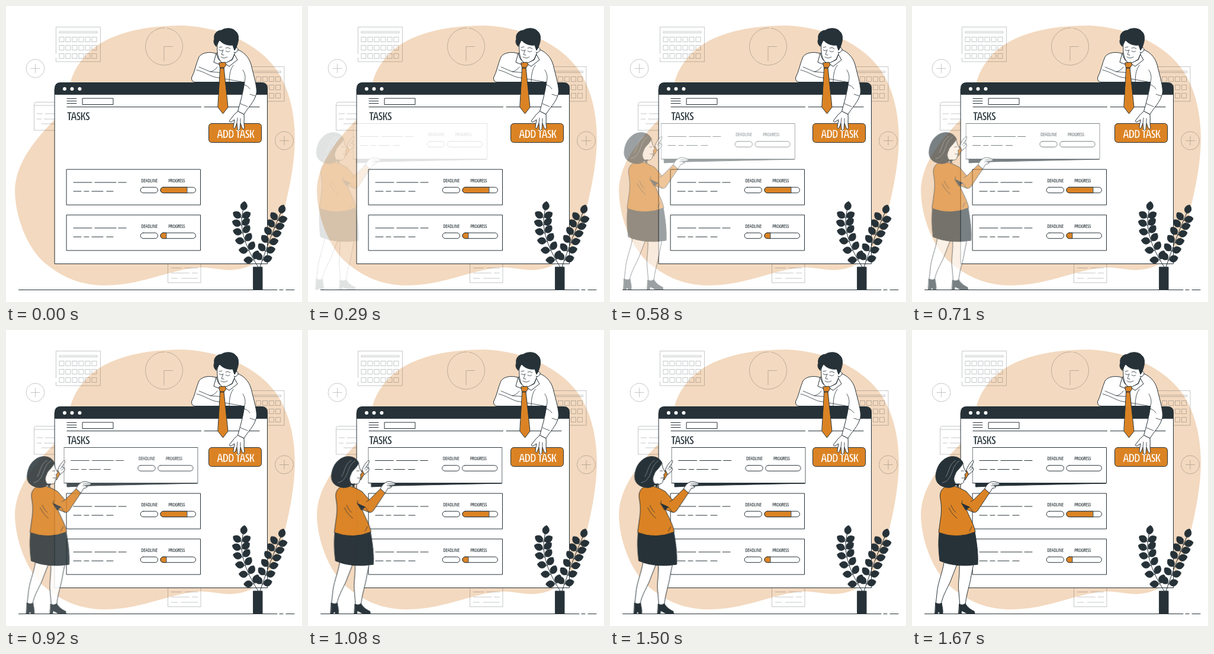
Animation of 500 by 500 pixels, one loop 1.71 s. Source, as an HTML page:

```html
<!DOCTYPE html>
<html lang="en">
<head>
<meta charset="utf-8">
<title>Task board</title>
<style>
  html, body { margin: 0; width: 100%; height: 100%; overflow: hidden; background: #fff; }
  svg { display: block; width: 100%; height: 100%; }
  /* A thin outline in the ground colour lightens the heavy condensed face. */
  text { font-family: "Open Sans Condensed", "Open Sans", "Roboto Condensed", Roboto, sans-serif;
         font-stretch: 75%; letter-spacing: -.06em; fill: #263238; stroke: #fff; stroke-width: .3; }
  .title { font-size: 19.2px; stroke-width: .75; }
  .button { fill: #fff; stroke: #db8324; text-anchor: middle; }
  .small { font-size: 8.2px; text-anchor: middle; }
  .line, .paper, .ink, .accent { stroke: #263238; stroke-width: 1; stroke-linejoin: round; stroke-linecap: round; }
  .line { fill: none; }
  .paper { fill: #fff; }
  .ink { fill: #263238; }
  .accent { fill: #db8324; }
  .fine { stroke-width: .8; }
  .faint { fill: none; stroke: #263238; stroke-width: .9; opacity: .3; }
</style>
</head>
<body>
<svg viewBox="0 0 500 500">
  <defs>
    <g id="calendar">
      <path d="M.5.5H75.5V59H.5V52M.5 46V.5M6 8H70V10.500H6Z"/>
      <g id="cells"></g>
    </g>
    <g id="plus"><circle r="15.5"/><path d="M-8 0H8M0-8V8"/></g>
    <g id="card">
      <rect class="paper" x=".5" y=".5" width="226" height="60"/>
      <path class="line" d="M12 22.5H43M48 22.5H84M88 22.5H101M12 37.5H25M30 37.5H38M43 37.5H62M68 37.5H79"/>
      <text class="small" x="140" y="22.3">DEADLINE</text>
      <text class="small" x="186" y="22.3">PROGRESS</text>
      <rect class="paper" x="125.2" y="30.7" width="29.3" height="9.5" rx="4.7"/>
      <rect class="paper" x="159" y="30.7" width="59.4" height="9.5" rx="4.7"/>
    </g>
  </defs>

  <path fill="#f3d9bf" d="M108 133C112 114 121 99 134 84C162 53 215 33 300 33C370 37 425 65 455 105C480 140 488 185 488 225C487 280 474 325 466 362C455 405 430 440 390 445C365 449 345 439 318 442C265 450 225 472 165 472C120 471 90 455 62 431C35 405 15 355 15 310C17 270 40 235 82 192C100 170 104 150 108 133Z"/>

  <g class="faint">
    <use href="#calendar" x="84" y="35"/>
    <use href="#calendar" x="394.5" y="102"/>
    <circle cx="267" cy="68.5" r="31.5" stroke-dasharray="150 3 40 0"/>
    <path d="M282 68.5H267V93"/>
    <use href="#plus" x="49.5" y="105.5"/>
    <use href="#plus" x="470" y="227.5"/>
    <path d="M83 162.5H51Q47.5 162.5 47.5 166V210H83M47.5 168H83M52 182H62M66 182H83M52 191H60M64 191H83M60 199H83"/>
    <path d="M273.5 436V467.5H329V436M279 442.5H297M302 442.5H324M279 451H310M314 451H324M279 460H290M296 460H324"/>
  </g>

  <path class="line" d="M21.5 479.5H458M462 479.5H468M473 479.5H487"/>

  <g id="window">
    <path class="paper" d="M82.5 140H441.5V435.5H82.5Z"/>
    <path class="ink" d="M82.5 149V139Q82.5 129.5 92 129.5H432Q441.5 129.5 441.5 139V149Z"/>
    <g fill="#fff"><circle cx="99" cy="140" r="3"/><circle cx="111.5" cy="140" r="3"/><circle cx="124.5" cy="140" r="3"/></g>
    <path class="line" d="M103 156.5H119M103 160.5H119M103 164.5H119M129.5 156H181V166.5H129.5ZM103 170.5H329.5M335 170.5H428"/>
    <text class="title" x="103" y="193.3">TASKS</text>
    <use href="#card" x="102" y="275.5"/>
    <path class="accent" d="M305.5 306.2H265.7A4.7 4.7 0 0 0 265.7 315.700H305.5Z"/>
    <use href="#card" x="102" y="352.5"/>
    <path class="accent" d="M270.500 383.2H265.7A4.7 4.7 0 0 0 265.7 392.700H270.500Z"/>
    <rect class="accent" x="342.5" y="198.5" width="89" height="32" rx="5"/>
    <text class="title button" x="387.7" y="222.8">ADD TASK</text>
  </g>

  <g id="man">
    <path class="paper" d="M354 80C345 77 331 78 326 86C321 97 319 111 313.5 121Q313 128.5 320 128.5H403C401 144 396 162 391.5 178L402 183C409 171 419 163 423 148C425 138 418 116 414 99C410 85 400 76 389 73Z"/>
    <path class="line fine" d="M322 108C334 111 345 118 352 120L398 128M326 103L345 111L368 113M357 103Q352 110 345 111M403 128C405 121 404 114 400 108M412 140Q408 134 402 133M421 152L412 149M396 165L408 170M384 100Q377 108 377 128"/>
    <path class="paper" d="M357 66C356 78 358 90 364 95L371 97L382 90L388 76L386 56L360 56Z"/>
    <path class="paper" d="M386 72C389 67 394 72 391 76Q388 80 385 78"/>
    <path class="ink" d="M355 68C351 65 350 59 352 56C350 46 358 41 364 41C371 36 384 37 388 43C394 47 393 58 391 64L389 70L386 75L383 66C376 67 367 65 361 58C358 61 357 65 355 68Z"/>
    <path class="line fine" d="M360 74Q363 77 366 75M371 76Q375 79 378 76M360 70L365 69M371 71Q375 69 379 72M367 74L364 82L368 83M363 86Q368 90 374 86"/>
    <path class="paper" d="M355 80L351 95L361 99L365 96L359 90ZM386 82L391 91L377 102L369 97L382 91Z"/>
    <path class="accent" d="M362 104H368L375 171L366.5 182L358 171ZM360 96L370 95L372 99L368 105H362Z"/>
    <path class="paper" d="M392 178L402 183C403 192 401 198 403 206Q401 210 399 206L396 198L395 208Q392 212 391 208L390 198L387 206Q384 208 384 204L386 192L380 196Q376 196 378 193L385 184Z"/>
    <path class="line fine" d="M391 189L390 198M396 190V198"/>
  </g>

  <g id="plant">
    <rect class="ink" x="418" y="441" width="15" height="38"/>
  </g>

  <g id="delivery" opacity="0">
    <path class="ink" d="M107.5 259H328L148 263L108 265Z"/>
    <use href="#card" x="102" y="198"/>

    <path class="paper" d="M54 393C51 412 43 428 42 446L40 464H49C52 446 63 432 67 419L76 396Z"/>
    <path class="paper" d="M80 397C81 414 77 428 79 442L81 466H90C91 448 98 430 100 415L104 395Z"/>
    <path class="ink" d="M40 461Q46 464 50 461L52 473V479H47L45 475L43 479H39ZM80 463Q86 466 90 462C94 469 100 473 105 475L106 479H93L84 474L83 479H79Z"/>
    <path class="ink" d="M46 342C44 358 45 375 47 390Q75 402 111 396C112 376 109 358 106 340Z"/>

    <path class="accent" d="M87 248L93 235L97 241L90 253Z"/>
    <path class="paper" d="M92 236C94 230 98 224 103 220Q105 221 103 225L99 231L103 233Q105 236 102 239L96 244Z"/>
    <path class="line fine" d="M99 231L96 235M103 233L98 237"/>

    <path class="paper" d="M66 255L65 268L80 272L78 260Q87 262 88 254L90 248L89 244L92 241L88 234L85 222H70Z"/>
    <path class="accent" d="M56 265C49 269 46 276 48 286C50 297 50 308 48 320L45 342Q76 354 107 341C104 326 96 315 92 303L104 308Q108 309 111 305L131 275L123 268L104 287L92 273Q80 266 72 264Z"/>
    <path class="ink" d="M84 293L97 299L91 304Z"/>
    <path class="line fine" d="M85 288L84 293M97 299L104 308M62 300Q68 312 76 318M66 296Q69 304 74 308M97 340L101 332M104 287L99 290"/>
    <path class="paper" d="M123 268C126 261 131 256 138 256L147 258Q149 261 146 262L138 263L142 265Q139 268 136 267L131 275Z"/>
    <path class="line fine" d="M135 260L146 260M134 263H138"/>

    <path class="ink" d="M86 225C82 212 65 211 55 218C45 225 41 235 40 247C40 259 48 264 58 266C65 267 71 265 75 261C71 257 69 251 73 244C74 238 82 234 86 225Z"/>
    <path class="ink" d="M74 260L80 260L77 265Z"/>
    <path fill="none" stroke="#fff" stroke-width=".5" opacity=".75" d="M80 221C69 228 69 240 64 248Q60 256 51 258M74 220C62 227 63 240 57 248"/>
    <path class="line fine" d="M83 238L87 238M84 250Q87 251 89 249"/>
  </g>
</svg>

<script>
const $ = id => document.getElementById(id);
const SVG = 'http://www.w3.org/2000/svg';
const add = (parent, tag, attrs) => {
  const el = document.createElementNS(SVG, tag);
  for (const key in attrs) el.setAttribute(key, attrs[key]);
  return parent.appendChild(el);
};

for (let row = 0; row < 3; row++)
  for (let col = 0; col < 6; col++)
    add($('cells'), 'rect', { x: 6 + col * 11, y: 17.5 + row * 14, width: 8, height: 8 });

// A quadratic stem with leaf pairs and one leaf at the tip.
function branch(x0, y0, x1, y1, x2, y2) {
  const plant = $('plant');
  add(plant, 'path', { class: 'line', d: `M${x0} ${y0}Q${x1} ${y1} ${x2} ${y2}` });
  const at = (a, b, c, u) => (1 - u) ** 2 * a + 2 * u * (1 - u) * b + u * u * c;
  const slope = (a, b, c, u) => (1 - u) * (b - a) + u * (c - b);
  const leaf = (u, turn) => {
    const angle = Math.atan2(slope(y0, y1, y2, u), slope(x0, x1, x2, u)) * 180 / Math.PI + turn;
    add(plant, 'path', {
      class: 'ink fine',
      d: 'M0 0H2C4-8 13-8 17-1C13 7 5 7 2 0',
      transform: `translate(${at(x0, x1, x2, u)} ${at(y0, y1, y2, u)}) rotate(${angle})`
    });
  };
  for (let i = 0; i < 6; i++) {
    const u = .11 + i * .15;
    leaf(u, -58);
    leaf(u, 58);
  }
  leaf(1, 0);
}
branch(426, 441, 390, 385, 400, 347);
branch(429, 441, 447, 388, 463, 352);

const LOOP = 1710, START = 170, FPS = 24, STEPS = 41, SKIP = 5;

// cubic-bezier(.36, -.01, .5, 1.38), solved by bisection
function ease(x) {
  const curve = (a, b, s) => 3 * a * s * (1 - s) ** 2 + 3 * b * s * s * (1 - s) + s ** 3;
  let lo = 0, hi = 1;
  for (let i = 0; i < 30; i++) {
    const mid = (lo + hi) / 2;
    if (curve(.36, .5, mid) < x) lo = mid; else hi = mid;
  }
  return curve(-.01, 1.38, hi);
}

const pose = (time, y, opacity) => ({
  offset: time / LOOP,
  transform: `translateX(${30 * (y - 1)}px)`,
  opacity,
  easing: 'step-end'
});

const frames = [pose(0, 0, 0)];
for (let n = SKIP; n <= STEPS; n++) {
  const time = Math.floor((START + (n - SKIP) * 1000 / FPS + .01) / 10) * 10;
  const y = ease(n / STEPS);
  frames.push(pose(time, y, Math.min(1, y)));
}
frames.push(pose(LOOP, 1, 1));
$('delivery').animate(frames, { duration: LOOP, iterations: Infinity });
</script>
</body>
</html>
```
